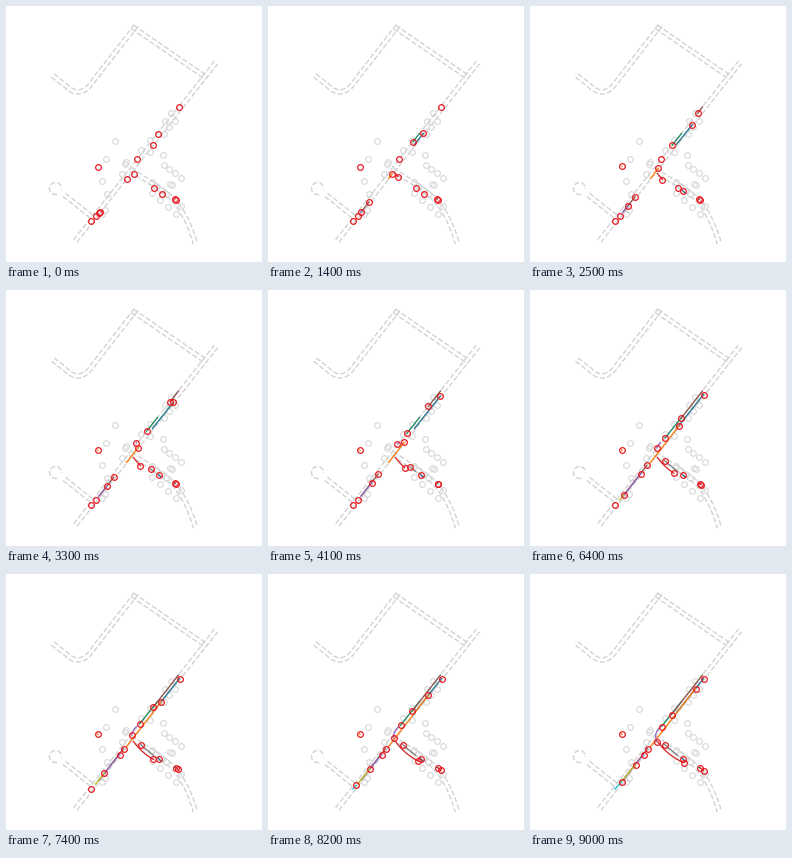
These frames come from a looping animation (256 px wide and 256 px high, 9100 ms). A matplotlib script:

```python
import numpy as np
import matplotlib.pyplot as plt
from matplotlib.animation import FuncAnimation

SIZE, FRAMES, STEP_MS = 256, 91, 100
GREY, RED = "#d3d3d3", "#e8141c"
TEAL, SEA = "#1f728f", "#1f8a60"


def bezier(a, c, b, s):
    s = np.asarray(s, float)[:, None]
    a, c, b = map(np.array, (a, c, b))
    return (1 - s) ** 2 * a + 2 * s * (1 - s) * c + s ** 2 * b


def walk(start, end, begin, stop, power=1, bend=0):
    """Positions per frame; bend bows the path sideways, power eases it."""
    dx, dy = np.subtract(end, start)
    side = np.array([-dy, dx]) / np.hypot(dx, dy)
    s = np.clip((np.arange(FRAMES) - begin) / (stop - begin), 0, 1) ** power
    return bezier(start, np.add(start, end) / 2 + bend * side, end, s)


fig = plt.figure(figsize=(SIZE / 72, SIZE / 72), dpi=72, facecolor="white")
ax = fig.add_axes([0, 0, 1, 1])
ax.set(xlim=(0.5, SIZE + 0.5), ylim=(SIZE + 0.5, 0.5))
ax.axis("off")


def dashed(p):
    ax.plot(p[:, 0], p[:, 1], color=GREY, lw=1.4, dashes=(3.7, 1.6), zorder=1)


def road(points, half=2.1):
    p = np.array(points, float)
    d = np.gradient(p, axis=0)
    n = np.stack([-d[:, 1], d[:, 0]], 1) / np.hypot(*d.T)[:, None]
    dashed(p + half * n)
    dashed(p - half * n)


def rings(points, color, width, z):
    line, = ax.plot(*np.transpose(points), "o", ms=5.7, mfc="none", mec=color,
                    mew=width, zorder=z)
    line.set_snap(False)
    return line


u = np.linspace(0, 1, 24)
road([(69.8, 235.5), (210.5, 57)])
road([(127, 21.5), (201, 72.3)])
road(np.vstack([(47.3, 70), bezier((60, 80), (75, 95), (88, 75), u),
                (131.5, 19)]))
road(np.vstack([(125, 164), bezier((157, 185), (179, 200), (189.8, 238), u)]))
road([(86, 211), (57, 188)])
angle = np.radians(np.linspace(75, 365, 30))
dashed(np.stack([50 + 6 * np.cos(angle), 183 + 6 * np.sin(angle)], 1))

# Goals stand in short rows: first, last, count
ROWS = [((109, 135), (100, 153), 2), ((96, 175), (101, 188), 2),
        ((120, 156), (119, 158), 2), ((165, 107), (159, 115), 2),
        ((169, 115), (158, 128), 3), ((144, 134), (135, 144), 2),
        ((144, 146), (157, 149), 2), ((158, 159), (175, 172), 4),
        ((164, 178), (166, 179), 2), ((146, 176), (160, 188), 4),
        ((146, 187), (170, 208), 4), ((99, 204), (96, 208), 2),
        ((116, 168), (175, 200), 2)]
rings(np.vstack([np.linspace(*row) for row in ROWS]), GREY, 1, 2)

WALKERS = [
    (TEAL, walk((147, 139), (174, 105), 0, 43)),
    ("C1", walk((121, 173), (166, 115), 0, 90, 1.35)),
    (SEA, walk((152, 128), (132, 153), 0, 90, 0.6)),
    ("C3", walk((128, 168), (154, 189), 0, 90, 1.15, bend=4.5)),
    ("C5", walk((94, 206), (118, 175), 0, 66, 0.75)),
    ("C4", walk((93, 207), (114, 181), 13, 72, 0.85)),
    ("C5", walk((173, 101.5), (142, 141), 17, 90, 0.85)),
    ("C7", walk((148, 182), (135, 171), 25, 62)),
    ("C8", walk((90, 210.5), (106, 191), 55, 90)),
    ("C9", walk((85.5, 215.5), (92, 208), 74, 90)),
    ("C4", walk((131, 153.2), (127, 168), 25, 90, 1.8, bend=5)),
    (TEAL, walk((156, 188), (153, 185), 14, 25)),
    ("C1", walk((92.5, 161), (92, 160.4), 14, 55)),
    (SEA, walk((169, 193.5), (170, 194), 0, 41)),
    ("C3", walk((170.7, 194.4), (174, 197), 55, 90)),
]

trails = [ax.plot([], [], color=c, lw=1.3, zorder=3)[0] for c, _ in WALKERS]
dots = rings([p[0] for _, p in WALKERS], RED, 1.2, 4)


def draw(i):
    for line, (_, p) in zip(trails, WALKERS):
        line.set_data(p[:i + 1].T)
    dots.set_data(np.transpose([p[i] for _, p in WALKERS]))
    return [*trails, dots]


anim = FuncAnimation(fig, draw, frames=FRAMES, interval=STEP_MS,
                     repeat=True, repeat_delay=0, blit=False)
plt.show()
```
